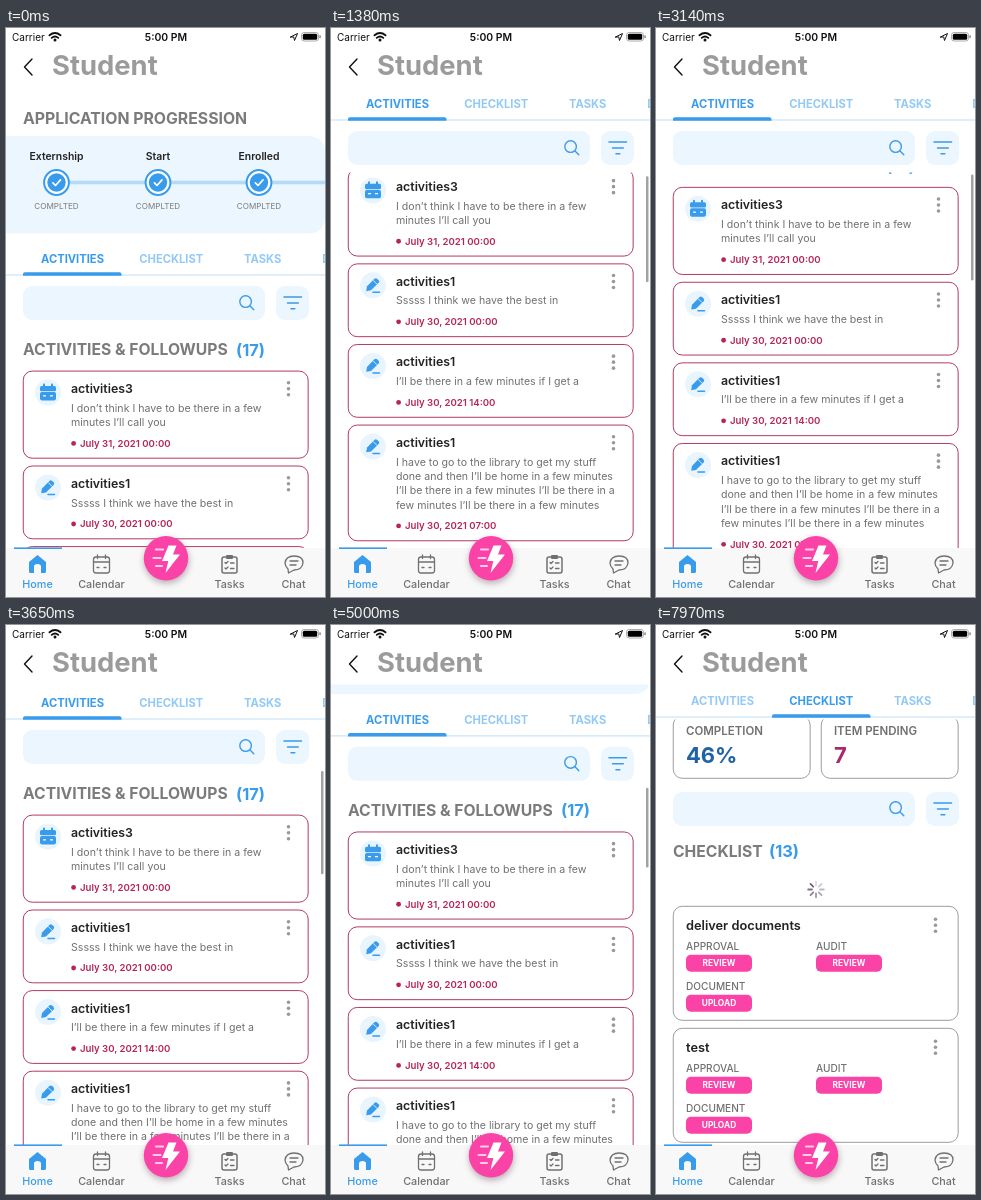
Animation, 319 px wide and 569 px high, one loop 8000 ms. Source, as an HTML page:

```html
<!DOCTYPE html>
<html lang="en">
<head>
<meta charset="utf-8">
<title>Student activities</title>
<style>
  html, body { margin: 0; width: 100%; height: 100%; overflow: hidden; background: #fff; }
  svg { display: block; width: 319px; height: 569px; font-family: Inter, "Open Sans", sans-serif; }
  text { white-space: pre; }
  .line { fill: none; stroke-linecap: round; stroke-linejoin: round; }
</style>
</head>
<body>
<svg id="stage" viewBox="0 0 319 569"></svg>
<script>
const BLUE = '#399bec', PALE = '#ecf6fe', SOFT = '#93c9f5', GREY = '#7b7b7b';
const INK = '#222', CRIMSON = '#b5245a', BORDER = '#b33a63', PINK = '#fb43a7', MID = '#707070';
const LOOP = 8000, PIN = 155, SWITCH = 6600;

// y is the middle of the capital letters
const text = (x, y, size, weight, fill, str, anchor = 'start') =>
  `<text x="${x}" y="${y + size * 0.36}" font-size="${size}" font-weight="${weight}" fill="${fill}" text-anchor="${anchor}">${str}</text>`;
const rect = (x, y, w, h, r, fill, more = '') =>
  `<rect x="${x}" y="${y}" width="${w}" height="${h}" rx="${r}" fill="${fill}" ${more}/>`;
const dot = (x, y, r, fill, more = '') => `<circle cx="${x}" cy="${y}" r="${r}" fill="${fill}" ${more}/>`;
const line = (d, color, width = 1.5) => `<path class="line" d="${d}" stroke="${color}" stroke-width="${width}"/>`;
const at = (x, y, body) => `<g transform="translate(${x} ${y})">${body}</g>`;
const group = (id, body) => `<g id="${id}">${body}</g>`;
const frame = (x, y, w, h, color) => rect(x, y, w, h, 9, '#fff', `stroke="${color}"`);
const menu = (x, y) => [-6, 0, 6].map(d => dot(x, y + d, 1.8, '#999')).join('');

const calendarIcon =
  rect(-8, -6.5, 16, 5.4, 1.5, BLUE) + rect(-8, -0.3, 16, 8.3, 1.8, BLUE) +
  line('M-4 -8V-5M4 -8V-5', BLUE, 2) + line('M-4.500 3.400H-2.500M2.500 3.400H4.500', '#fff', 1.3);
const pencilIcon =
  `<path d="M-6.800 6L-6 1.200L1.400 -6.400Q2.800 -7.600 4.200 -6.400L5.600 -5Q6.800 -3.600 5.600 -2.300L-2 5.200Z" fill="${BLUE}"/>` +
  line('M.4 -4.600L3.800 -1.200', PALE, 0.9) + line('M0 7.200H6.500', BLUE, 1.5);

const thoughts = 'I’ll be there in a few minutes I’ll be there in a';
const activities = [
  ['activities3', ['I don’t think I have to be there in a few', 'minutes I’ll call you'], 'July 31, 2021 00:00'],
  ['activities1', ['Sssss I think we have the best in'], 'July 30, 2021 00:00'],
  ['activities1', ['I’ll be there in a few minutes if I get a'], 'July 30, 2021 14:00'],
  ['activities1', ['I have to go to the library to get my stuff',
    'done and then I’ll be home in a few minutes', thoughts,
    'few minutes I’ll be there in a few minutes'], 'July 30, 2021 07:00'],
  ['activities1', ['I’ll be there in a few minutes'], 'July 29, 2021 10:00'],
];

function activityCards() {
  let y = 343.1;
  return activities.map(([title, body, date], i) => {
    const dateY = 58 + 14.3 * (body.length - 1), height = dateY + 14.8;
    const card = at(0, y,
      frame(17.25, 0, 284.9, height, BORDER) +
      dot(42, 21.5, 13, '#e8f4fe') + at(42, 21.3, i ? pencilIcon : calendarIcon) +
      text(65, 17.5, 12.35, 600, INK, title) + menu(282.5, 17.7) +
      body.map((s, n) => text(65, 36.8 + 14.3 * n, 10.6, 400, MID, s)).join('') +
      dot(67.6, dateY, 2.4, CRIMSON) + text(74, dateY, 9.6, 600, CRIMSON, date));
    y += height + 7.8;
    return card;
  }).join('');
}

const heading = (y, label, count, countX) =>
  text(17, y, 15.7, 700, GREY, label) + text(countX, y, 16.4, 700, BLUE, count);

const searchRow = y => at(0, y,
  rect(17, 0, 242, 34, 9, PALE) + rect(270, 0, 33, 34, 9, PALE) +
  dot(239.6, 15.6, 5.8, 'none', `stroke="${BLUE}" stroke-width="1.4"`) + line('M244 20L247.800 23.800', BLUE, 1.4) +
  line('M278 11H295.500M281.500 17H292.300M285 22.800H288.800', BLUE, 1.5));

const step = (x, label) =>
  text(x, 128.5, 10.4, 600, INK, label, 'middle') +
  dot(x, 154.5, 12.4, '#fff', `stroke="${BLUE}" stroke-width="2"`) + dot(x, 154.5, 9.2, BLUE) +
  line(`M${x - 3.6} 154.8l2.6 2.7l5 -5.6`, '#fff', 1.7) +
  text(x, 178, 8.1, 400, GREY, 'COMPLTED', 'middle');

const progress =
  text(17, 90, 15.8, 700, GREY, 'APPLICATION PROGRESSION') +
  `<path d="M0 108H301Q319 108 319 124V189Q319 205.500 301 205.500H0Z" fill="${PALE}"/>` +
  rect(50, 152.7, 269, 3.6, 0, '#b4dafa') +
  step(50.5, 'Externship') + step(152, 'Start') + step(253, 'Enrolled');

const tabs =
  rect(0, 205.5, 319, 44, 0, '#fff') + rect(0, 246.2, 319, 1.6, 0, '#d6eafb') +
  ['ACTIVITIES', 'CHECKLIST', 'TASKS', 'DOCUMENTS'].map((s, i) =>
    `<g class="tab">${text([35, 133.3, 238, 316.2][i], 231.3, 11.2, 700, 'inherit', s)}</g>`).join('') +
  `<path id="underline" d="M17 247.700V246Q17 244.200 19 244.200H113.500Q115.500 244.200 115.500 246V247.700Z" fill="${BLUE}"/>`;

const pill = (x, y, s) => rect(x, y, 66, 17, 5, PINK) + text(x + 33, y + 8.5, 8.4, 700, '#fff', s, 'middle');
const checkCard = (y, title) => at(0, y,
  frame(17.25, 0, 284.9, 114, '#9c9c9c') + text(30, 19, 12.8, 600, INK, title) + menu(279.5, 19) +
  text(30, 39.8, 10.1, 500, MID, 'APPROVAL') + text(160, 39.8, 10.1, 500, MID, 'AUDIT') +
  pill(30, 48.5, 'REVIEW') + pill(160, 48.5, 'REVIEW') +
  text(30, 79.8, 10.1, 500, MID, 'DOCUMENT') + pill(30, 88.5, 'UPLOAD'));
const stat = (x, label, value, color) =>
  frame(x, 91, 136.9, 62.3, '#9c9c9c') + text(x + 12.7, 106, 11.5, 600, MID, label) +
  text(x + 12.7, 130.5, 22, 700, color, value);
const spokes = Array.from({ length: 8 }, (_, i) =>
  `<path class="line spoke" d="M0 -4V-7.800" stroke="#6f5f7d" stroke-width="1.800" transform="rotate(${i * 45})"/>`).join('');
const checklist =
  stat(17.25, 'COMPLETION', '46%', '#1f62a5') + stat(165.25, 'ITEM PENDING', '7', '#a9286e') +
  searchRow(167) + heading(226, 'CHECKLIST', '(13)', 113) + at(160, 264.5, spokes) +
  checkCard(281.3, 'deliver documents') + checkCard(403.3, 'test');

const header =
  rect(0, 0, 319, 59.5, 0, '#fff') +
  text(6, 9, 10, 400, '#111', 'Carrier') + text(160, 9, 10.4, 600, '#111', '5:00 PM', 'middle') +
  line('M43.500 7.300Q49 2.800 54.500 7.300', '#111', 1.9) + line('M45.700 9.900Q49 7 52.300 9.900', '#111', 1.8) +
  dot(49, 12, 1.5, '#111') +
  line('M284.500 9L291.500 5.500L288.500 12.500L287.800 9.300Z', '#111', 1) +
  rect(295.5, 4.5, 17, 8.5, 2.6, 'none', 'stroke="#999" stroke-width=".8"') +
  rect(296.8, 5.8, 14.4, 5.9, 1.5, '#000') + rect(313.4, 7.2, 1.3, 3, 0.6, '#777') +
  line('M26 31L18.500 39L26 47', '#111', 1.4) + text(46, 37.6, 27.4, 700, '#9b9b9b', 'Student');

const navLabel = (x, s, color) => text(x, 556, 10.8, 500, color, s, 'middle');
const nav =
  rect(0, 520, 319, 49, 0, '#f8f8f8') + rect(8, 519.4, 48, 1.6, 0, BLUE) +
  `<path d="M23 534L31.500 527L40 534V543.500Q40 545 38.500 545H35V538.500Q35 536 31.500 536Q28 536 28 538.500V545H24.500Q23 545 23 543.500Z" fill="${BLUE}"/>` +
  at(95.5, 536, rect(-8, -7, 16, 16, 2.5, 'none', `stroke="${MID}" stroke-width="1.300"`) +
    line('M-8 -2H8M-4 -9V-5.500M4 -9V-5.500', MID, 1.3) + line('M-4.500 3.500H-2.500M2.500 3.500H4.500', MID, 1.3)) +
  at(223.5, 536, rect(-7.5, -7, 15, 16, 2, 'none', `stroke="${MID}" stroke-width="1.500"`) + rect(-3.5, -9, 7, 4, 1, MID) +
    line('M-4.500 -1.500l1 1l2 -2M-4.500 4l1 1l2 -2M1 -1H4.500M1 4.500H4.500', MID, 1.3)) +
  at(288, 536, line('M-6 5Q-9 2 -9 -1Q-8 -8 0 -8Q9 -8 9 -1Q8 6 0 6L-5.500 9L-6 5Z', MID, 1.3) +
    line('M-4 -3H4M-4 1H2', MID, 1.3)) +
  navLabel(31.5, 'Home', BLUE) + navLabel(95.5, 'Calendar', MID) + navLabel(223.5, 'Tasks', MID) + navLabel(287.5, 'Chat', MID) +
  dot(160.5, 533, 22.5, '#6b4a5c', 'opacity=".42" filter="url(#blur)"') + dot(160, 530.3, 22.2, PINK) +
  line('M150 521.500H157M147.500 530H154.500M150 538H156', '#fdcde6', 2.2) +
  '<path d="M162.500 517.500H170.500L167 526.500H174L159.500 545L162.300 533H156Z" fill="#fff"/>';

const stage = document.getElementById('stage');
stage.innerHTML =
  '<defs><filter id="blur" x="-40%" y="-40%" width="180%" height="180%"><feGaussianBlur stdDeviation="3"/></filter></defs>' +
  group('list', heading(321.6, 'ACTIVITIES &amp; FOLLOWUPS', '(17)', 230) + activityCards()) +
  group('check', checklist) + group('progress', progress) +
  group('search', rect(0, 249, 319, 50.5, 0, '#fff') + searchRow(258)) +
  group('tabs', tabs) + header + nav +
  '<rect id="bar" x="315" width="2.500" rx="1.250" fill="#a2a2a2"/>';

const el = id => document.getElementById(id);
const [list, check, prog, search, tabRow, underline, bar] =
  ['list', 'check', 'progress', 'search', 'tabs', 'underline', 'bar'].map(el);
const tabLabels = [...document.querySelectorAll('.tab text')];
const spinner = [...document.querySelectorAll('.spoke')];

const ease = {
  linear: p => p,
  in: p => p * p,
  out: p => 1 - (1 - p) ** 2,
  both: p => p * p * (3 - 2 * p),
};
// time, value, easing towards that value
const scrollSteps = [
  [0, 0], [30, 0], [800, 135, 'in'], [840, 135], [1450, 203, 'out'], [2625, 203], [2630, 201], [2700, 201],
  [2950, 184, 'both'], [3090, 184], [3650, 153, 'in'], [3690, 153], [3890, 128], [3950, 126],
  [4320, 80.5], [4510, 72, 'out'], [4690, 72], [5140, 155, 'both'], [5350, 155], [5690, 164.5, 'out'], [LOOP, 164.5],
];
const barSteps = [
  [0, 0], [30, 0], [130, 1], [1600, 1], [1730, 0, 'both'], [2629, 0], [2630, 1], [SWITCH, 1], [SWITCH + 1, 0], [LOOP, 0],
];
const slideSteps = [[0, 0], [SWITCH, 0], [SWITCH + 300, 1, 'both'], [LOOP, 1]];

function sample(steps, t) {
  const i = Math.max(1, steps.findIndex(s => s[0] > t));
  const [t0, a] = steps[i - 1], [t1, b, kind = 'linear'] = steps[i];
  return a + (b - a) * ease[kind]((t - t0) / (t1 - t0));
}

const shift = (node, x, y) => node.setAttribute('transform', `translate(${x} ${y})`);
const show = (node, on) => node.setAttribute('visibility', on ? 'visible' : 'hidden');

function draw(t) {
  const scroll = sample(scrollSteps, t), top = Math.min(scroll, PIN), inner = scroll - top;
  const onCheck = t >= SWITCH;
  shift(list, 0, -scroll);
  for (const node of [prog, search, tabRow]) shift(node, 0, -top);
  show(list, !onCheck);
  show(search, !onCheck);
  show(check, onCheck);

  shift(underline, 99 * sample(slideSteps, t), 0);
  tabLabels.forEach((label, i) => label.setAttribute('fill', i === +onCheck ? BLUE : SOFT));

  // the indicator shrinks while the header is pulled open
  bar.setAttribute('y', 299 - top + inner * 0.09);
  bar.setAttribute('height', Math.max(9, 106 - 1.4 * (PIN - top)));
  bar.setAttribute('opacity', sample(barSteps, t));

  const lead = Math.floor(t / 100);
  spinner.forEach((s, i) => s.setAttribute('opacity', 1 - 0.11 * ((lead - i + 80) % 8)));
}

const start = performance.now();
function tick() {
  draw((performance.now() - start) % LOOP);
  requestAnimationFrame(tick);
}
tick();
</script>
</body>
</html>
```
